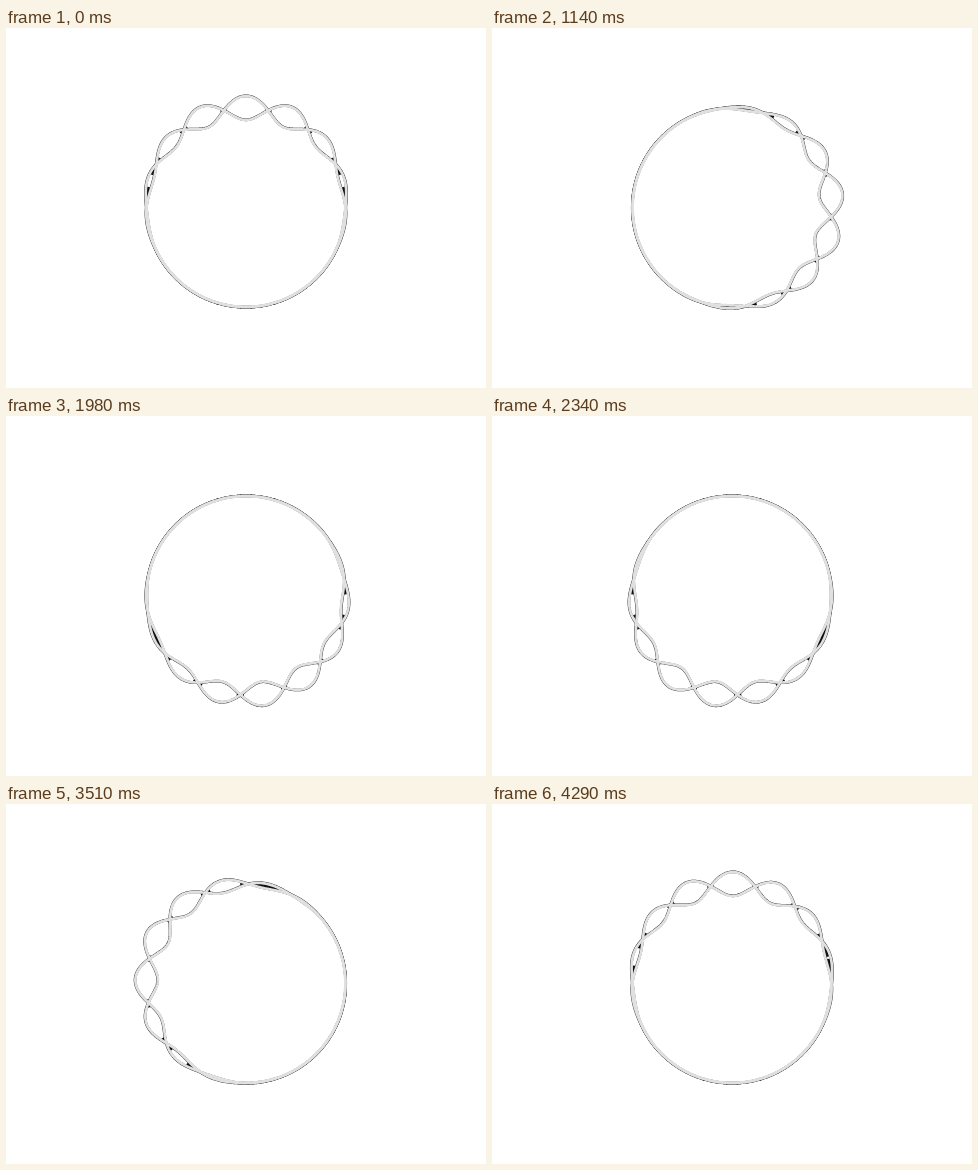
An HTML page with a canvas for the animation above (4.32 s loop, 480x360 px).

```html
<!DOCTYPE html>
<html lang="en">
<head>
<meta charset="utf-8">
<title>Twisting ring</title>
<style>
html, body { margin: 0; width: 100%; height: 100%; overflow: hidden; background: #fff; }
canvas { display: block; }
</style>
</head>
<body>
<canvas id="stage" width="480" height="360"></canvas>
<script>
const ctx = document.getElementById('stage').getContext('2d');
const LOOP = 4320, STEP = 30;
const CX = 240, CY = 179.5, RADIUS = 99.4, SWELL = 12;
const WAVES = 7, DRIFT = 17 * Math.PI;
const SPREAD = 66 * Math.PI / 180;
const POINTS = 720;
const LINE = 2.7, RIM = 0.3, NARROW = 5.2;

// Half the distance between the strands, at angle u from the middle of the twist.
function offset(u, t) {
  const swell = SWELL * Math.exp(-((Math.abs(u) / SPREAD) ** 2.4));
  return swell * Math.cos(WAVES * u + DRIFT * t);
}

function point(u, t, r) {
  const a = u + 2 * Math.PI * t;
  return [CX + r * Math.sin(a), CY - r * Math.cos(a)];
}

const angles = Array.from({ length: POINTS }, (_, i) => (i / POINTS * 2 - 1) * Math.PI);

function strand(t, side, radius) {
  const path = new Path2D();
  for (const u of angles) path.lineTo(...point(u, t, radius + side * offset(u, t)));
  path.closePath();
  return path;
}

// Slits where the strands nearly touch are dark.
function slits(t) {
  const path = new Path2D();
  for (const u of angles) {
    const d = offset(u, t);
    if (Math.abs(d) * 2 > NARROW) continue;
    path.moveTo(...point(u, t, RADIUS - d));
    path.lineTo(...point(u, t, RADIUS + d));
  }
  return path;
}

function stroke(path, color, width) {
  ctx.strokeStyle = color;
  ctx.lineWidth = width;
  ctx.stroke(path);
}

function draw(t) {
  ctx.clearRect(0, 0, 480, 360);
  stroke(slits(t), '#111', 1.2);
  for (const [color, shift] of [['#111', RIM], ['#e0e0e0', 0]]) {
    for (const side of [1, -1]) stroke(strand(t, side, RADIUS + shift), color, LINE);
  }
}

const start = performance.now();
function tick() {
  const ms = (performance.now() - start) % LOOP;
  draw(Math.floor(ms / STEP) * STEP / LOOP);
  requestAnimationFrame(tick);
}
tick();
</script>
</body>
</html>
```
